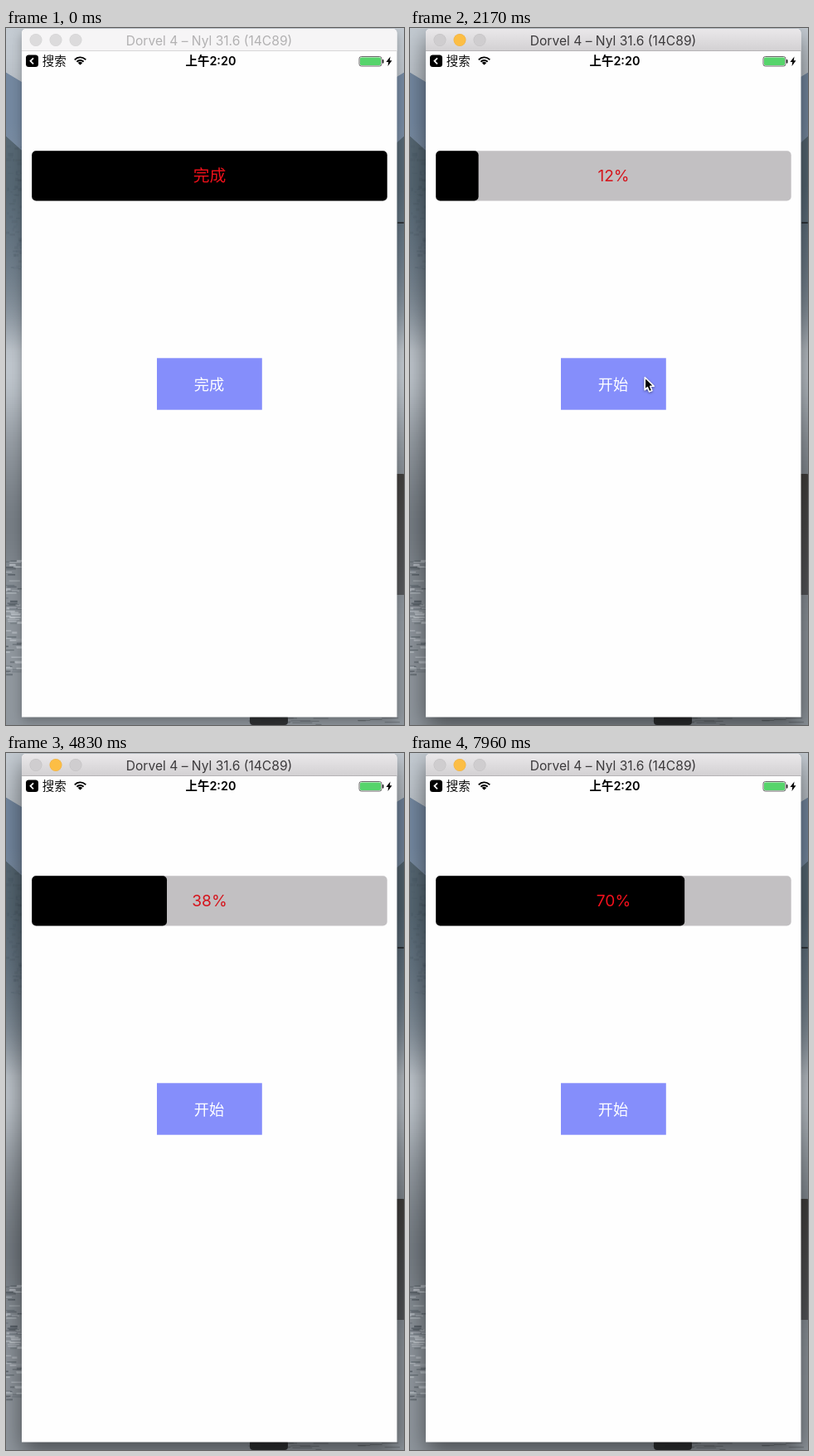
An HTML page with a canvas that plays this animation: 480 px wide and 841 px high, repeating every 8 s.

```html
<!DOCTYPE html>
<html lang="zh">
<head>
<meta charset="utf-8">
<title>Progress button</title>
<style>
html, body { margin: 0; width: 100%; height: 100%; overflow: hidden; background: #8d969e; }
canvas { display: block; width: 480px; height: 841px; }
</style>
</head>
<body>
<canvas id="stage" width="480" height="841"></canvas>
<script>
const W = 480, H = 841, LOOP = 8000;
const ACTIVATE = 870, START = 955, TICK = 100;
const ENTER = 330, PRESS = 780, EXIT = 4550;
const FONT = "Inter, 'Noto Sans CJK SC', 'Noto Sans CJK', sans-serif";
const WIN = { x: 19, y: 1, w: 452.5, h: 830.5 };
const BAR = { x: 31.2, y: 148.2, w: 428.5, h: 60.2 };
const MID = 245.5;

const ctx = document.getElementById("stage").getContext("2d");

function random(seed) {
  return () => (seed = (seed * 16807) % 2147483647) / 2147483647;
}

// smooth 0 to 1 between two times
function ease(t, from, to) {
  const u = Math.min(1, Math.max(0, (t - from) / (to - from)));
  return u * u * (3 - 2 * u);
}

function layer(draw) {
  const c = document.createElement("canvas");
  c.width = W;
  c.height = H;
  draw(c.getContext("2d"));
  return c;
}

function fade(g, y0, y1, from, to) {
  const grad = g.createLinearGradient(0, y0, 0, y1);
  grad.addColorStop(0, from);
  grad.addColorStop(1, to);
  return grad;
}

function box(g, x, y, w, h, r, fill) {
  g.beginPath();
  g.roundRect(x, y, w, h, r);
  g.fillStyle = fill;
  g.fill();
}

function disc(g, x, y, r, fill) {
  g.beginPath();
  g.arc(x, y, r, 0, Math.PI * 2);
  g.fillStyle = fill;
  g.fill();
}

function polygon(g, points, fill) {
  g.beginPath();
  points.forEach(([x, y]) => g.lineTo(x, y));
  g.closePath();
  g.fillStyle = fill;
  g.fill();
}

function label(g, text, x, y, size, fill, weight = 400, align = "center") {
  g.font = `${weight} ${size}px ${FONT}`;
  g.textAlign = align;
  g.fillStyle = fill;
  g.fillText(text, x, y);
}

// mountain sides that sink into the mist, mirrored at both edges
function drawRidge(g, top, slope, color) {
  const fill = fade(g, top + 60, 390, color, color + "00");
  for (let x = 0; x < 20; x++) {
    const y = top + x * slope;
    g.fillStyle = fill;
    g.fillRect(x, y, 1, 390 - y);
    g.fillRect(W - 1 - x, y, 1, 390 - y);
  }
}

function drawLake(g) {
  const rnd = random(77);
  const bump = (y, at, width) => Math.exp(-(((y - at) / width) ** 2));

  for (let y = 0; y < H; y++) {
    const v = 150 + 52 * bump(y, 0, 120) + 46 * bump(y, 410, 70) - 26 * bump(y, 600, 75);
    g.fillStyle = `rgb(${v - 6},${v + 1},${v + 8})`;
    g.fillRect(0, y, W, 1);
  }
  drawRidge(g, 54, 0.6, "#7488a0");
  drawRidge(g, 131, 0.9, "#566773");

  for (let i = 0; i < 60; i++) {
    g.fillStyle = `rgba(45,60,70,${0.05 + rnd() * 0.1})`;
    g.fillRect(rnd() * 18, 140 + rnd() * 150, 2 + rnd() * 5, 1 + rnd() * 3);
  }
  for (let i = 0; i < 70; i++) {
    const dark = rnd() < 0.5;
    g.fillStyle = dark ? `rgba(45,54,62,${0.15 + rnd() * 0.35})` : "rgba(205,211,217,.5)";
    g.fillRect(rnd() * 20 - 6, 640 + rnd() * 140, 5 + rnd() * 10, 1 + rnd() * 1.4);
  }

  // rock on the right, its reflection below
  box(g, 470, 538, 20, 146, [0, 12, 0, 0], fade(g, 538, 684, "#413f3d", "#55575a"));
  box(g, 472, 234, 8, 2, 1, "#30363b");
  box(g, 294, 829, 46, 12, 4, "#2f3133");
  for (let i = 0; i < 16; i++) {
    g.fillStyle = "rgba(55,60,65,.35)";
    g.fillRect(290 + rnd() * 170, 832 + rnd() * 8, 6 + rnd() * 18, 1);
  }
}

function drawWifi(g, x, y) {
  for (let i = 0; i < 3; i++) {
    g.lineWidth = i ? 1.9 : 3.4;
    g.beginPath();
    g.arc(x, y, 2 + i * 3.6, -Math.PI * 0.76, -Math.PI * 0.24);
    g.stroke();
  }
}

function drawStatus(g) {
  box(g, 24, 32.5, 15, 14.5, 3.5, "#000");
  g.lineWidth = 1.8;
  g.strokeStyle = "#fff";
  g.beginPath();
  g.moveTo(33, 36.3);
  g.lineTo(29.5, 39.8);
  g.lineTo(33, 43.3);
  g.stroke();
  label(g, "搜索", 43.7, 45.2, 14.5, "#111", 400, "left");
  g.strokeStyle = "#000";
  drawWifi(g, 89.5, 44.6);
  label(g, "上午2:20", 247, 45.2, 14.4, "#000", 600);

  g.lineWidth = 0.9;
  g.strokeStyle = "#555";
  g.beginPath();
  g.roundRect(426, 34.5, 27, 11.5, 2.5);
  g.stroke();
  box(g, 427, 35.5, 25, 9.5, 1.5, "#56d46b");
  box(g, 453.8, 38, 1.7, 4.5, 1, "#222");

  // charging bolt: two halves turned about its centre
  for (const side of [1, -1]) {
    polygon(g, [[1.5, -5.7], [-3.5, 0.9], [0.5, 0.9]].map(([x, y]) => [462 + x * side, 40.2 + y * side]), "#000");
  }
}

function drawWindow(g, active) {
  g.drawImage(lake, 0, 0);
  g.save();
  g.shadowColor = active ? "rgba(0,0,0,.5)" : "rgba(0,0,0,.28)";
  g.shadowBlur = active ? 28 : 14;
  g.shadowOffsetY = active ? 11 : 5;
  box(g, WIN.x, WIN.y, WIN.w, WIN.h, [5, 5, 0, 0], "#fefefe");
  g.restore();

  box(g, WIN.x, WIN.y, WIN.w, 26.5, [5, 5, 0, 0],
    active ? fade(g, 1, 27, "#eae8ea", "#d3d1d3") : "#f6f5f6");
  g.fillStyle = active ? "#b5b3b5" : "#d8d7d8";
  g.fillRect(WIN.x, 27, WIN.w, 1);

  for (let i = 0; i < 3; i++) {
    const lit = active && i === 1, x = 36 + 24 * i;
    disc(g, x, 14.5, 7.5, lit ? "#eeb045" : active ? "#c2c0c2" : "#d3d2d3");
    disc(g, x, 14.5, 6.9, lit ? "#fcbe45" : active ? "#cfcdcf" : "#dcdbdc");
  }
  label(g, "Dorvel 4 – Nyl 31.6 (14C89)", 245, 20.6, 15.6, active ? "#3c3a3c" : "#b2b1b2");
  drawStatus(g);
}

const lake = layer(drawLake);
const idleWindow = layer(g => drawWindow(g, false));
const activeWindow = layer(g => drawWindow(g, true));

function drawBar(percent) {
  const w = BAR.w * percent / 100;
  box(ctx, BAR.x, BAR.y, BAR.w, BAR.h, 5, "#c2c0c2");
  box(ctx, BAR.x, BAR.y, w, BAR.h, Math.min(5, w / 2), "#000");
  if (percent < 100) label(ctx, percent + "%", MID, 185.2, 19.1, percent < 50 ? "#d5141c" : "#f3101c");
  else label(ctx, "完成", MID, 185.2, 19.8, "#ee101a");
}

function drawButton(text) {
  ctx.fillStyle = "#858efb";
  ctx.fillRect(182, 398.3, 126.8, 62.4);
  label(ctx, text, 245, 436.6, 18.2, "#fff");
}

function drawPointer(t) {
  const away = 1 - ease(t, ENTER, 760);
  const drift = ease(t, 2300, 3100);
  const leave = ease(t, 4150, EXIT);
  ctx.save();
  ctx.translate(283 + 200 * away + 7 * drift, 420 + 140 * away - 2 * drift + 425 * leave);

  if (t >= PRESS && t < START) {
    for (const [width, color] of [[4, "rgba(255,255,255,.85)"], [2, "#111"]]) {
      ctx.lineWidth = width;
      ctx.strokeStyle = color;
      ctx.beginPath();
      ctx.arc(0, 2, 26, 0, Math.PI * 2);
      ctx.stroke();
    }
  }

  const half = [[0, 0], [5.9, 14], [1.8, 12.4], [1.8, 18]];
  const mirror = half.map(([x, y]) => [-x, y]).reverse();
  ctx.translate(0.3, 1.5);
  ctx.rotate(-Math.PI / 8);
  ctx.shadowColor = "rgba(0,0,0,.35)";
  ctx.shadowBlur = 3;
  ctx.shadowOffsetY = 1;
  polygon(ctx, half.concat(mirror), "#000");
  ctx.lineWidth = 1.6;
  ctx.lineJoin = "round";
  ctx.strokeStyle = "#fff";
  ctx.stroke();
  ctx.restore();
}

function render(t) {
  const started = t >= START;
  ctx.drawImage(t >= ACTIVATE ? activeWindow : idleWindow, 0, 0);
  drawBar(started ? Math.floor((t - START) / TICK) : 100);
  drawButton(started ? "开始" : "完成");
  if (t > ENTER && t < EXIT) drawPointer(t);
}

const begin = performance.now();
function frame() {
  render((performance.now() - begin) % LOOP);
  requestAnimationFrame(frame);
}
frame();
</script>
</body>
</html>
```
